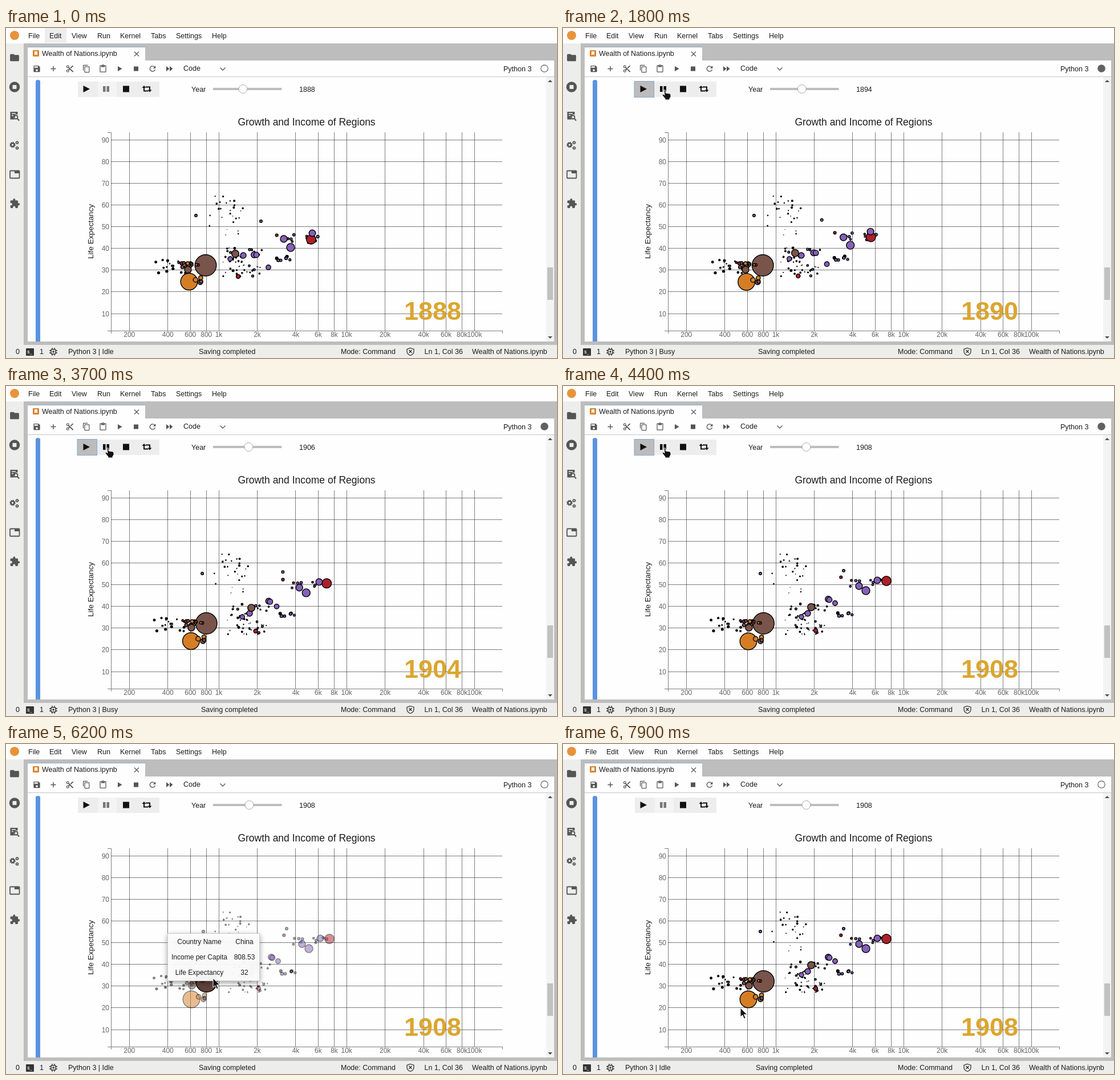
An HTML page for the animation above (8000 ms loop, 966 by 579 pixels).

```html
<!DOCTYPE html>
<html lang="en">
<head>
<meta charset="utf-8">
<title>Notebook bubble chart</title>
<style>
  html, body { margin: 0; width: 100%; height: 100%; overflow: hidden; background: #bdbdbd; }
  svg { display: block; width: 966px; height: 579px; font: 12.5px "Liberation Sans", Arial, sans-serif; }
  text { fill: #1c1c1c; white-space: pre; }
  .axis { font-size: 12px; fill: #666; }
  .mid { text-anchor: middle; }
  .end { text-anchor: end; }
</style>
</head>
<body>
<svg id="stage" viewBox="0 0 966 579" xmlns="http://www.w3.org/2000/svg"></svg>
<script>
const stage = document.getElementById('stage');

const set = (node, attrs) => { for (const key in attrs) node.setAttribute(key, attrs[key]); };
const show = (node, on) => node.setAttribute('visibility', on ? 'visible' : 'hidden');
function add(tag, attrs = {}, parent = stage) {
  const node = document.createElementNS('http://www.w3.org/2000/svg', tag);
  set(node, attrs);
  return parent.appendChild(node);
}
const rect = (x, y, width, height, fill, more, parent) =>
  add('rect', { x, y, width, height, fill, ...more }, parent);
const circle = (cx, cy, r, more, parent) => add('circle', { cx, cy, r, ...more }, parent);
const path = (d, more, parent) => add('path', { d, ...more }, parent);
const stroke = (d, color = '#555', width = 1.5) =>
  path(d, { fill: 'none', stroke: color, 'stroke-width': width });
function text(x, y, content, more, parent) {
  const node = add('text', { x, y, ...more }, parent);
  node.textContent = content;
  return node;
}
// 24-unit icon centred on (x, y)
const icon = (x, y, size, d) =>
  path(d, { fill: '#555', transform: `translate(${x - size / 2} ${y - size / 2}) scale(${size / 24})` });

// ---------- window chrome ----------
rect(0, 0, 966, 27, '#fefefe');
const editHover = rect(68, 0, 38, 26, '#ededed');
circle(15, 13, 8, { fill: '#e8933a' });
[['File', 39], ['Edit', 76], ['View', 115], ['Run', 160], ['Kernel', 200], ['Tabs', 254],
 ['Settings', 298], ['Help', 361]].forEach(([label, x]) => text(x, 17.5, label));
rect(0, 27, 31, 529, '#ededec');
rect(38, 33, 206, 25, '#fefefe');
rect(38, 33, 206, 1, '#8fb0c4');
rect(38, 57, 923, 28, '#fefefe');
rect(38, 86, 923, 464, '#fefefe');

rect(47, 39, 11, 11, '#d9822b', { rx: 1 });
path('M50 41h5v7l-2.5-2-2.5 2z', { fill: '#fff' });
text(63, 48.5, 'Wealth of Nations.ipynb');
stroke('M225 41.5l8 8m0-8l-8 8', '#555', 1.2);

// ---------- sidebar ----------
icon(15, 52, 19, 'M10 4H4c-1.1 0-2 .9-2 2v12c0 1.1.9 2 2 2h16c1.1 0 2-.9 2-2V8c0-1.1-.9-2-2-2h-8z');
circle(15, 103.5, 9.3, { fill: '#555' });
rect(11.5, 100, 7, 7, '#ededec', { rx: 1 });
path('M7.500 147h13v5a5 5 0 0 0-5 8.500h-8z', { fill: '#555' });
stroke('M10 150h7M10 153.500h3', '#ededec', 1.3);
circle(17.5, 156.5, 3, { fill: 'none', stroke: '#555', 'stroke-width': 1.8 });
stroke('M20 159l3 3.5', '#555', 2);
function gear(x, y, r) {
  circle(x, y, r, { fill: 'none', stroke: '#555', 'stroke-width': r * .9 });
  circle(x, y, r * 1.5, { fill: 'none', stroke: '#555', 'stroke-width': r * .5,
    'stroke-dasharray': r * 1.5 * Math.PI / 8 });
}
gear(11.5, 205, 3);
gear(19.5, 201, 1.8);
gear(19.5, 210.5, 1.8);
rect(7, 250.5, 16.5, 13, 'none', { rx: 1, stroke: '#555', 'stroke-width': 1.8 });
rect(15, 250, 8, 5, '#555');
icon(15.5, 308, 19, 'M20.5 11H19V7c0-1.1-.9-2-2-2h-4V3.5a2.500 2.500 0 0 0-5 0V5H4c-1.1 0-2 .9-2 2v3.8h1.5a2.700 2.700 0 0 1 0 5.400H2V20c0 1.1.9 2 2 2h3.8v-1.500a2.700 2.700 0 0 1 5.400 0V22H17c1.1 0 2-.9 2-2v-4h1.5a2.500 2.500 0 0 0 0-5z');

// ---------- toolbar ----------
icon(54, 71.5, 15, 'M17 3H5a2 2 0 0 0-2 2v14c0 1.1.9 2 2 2h14c1.1 0 2-.9 2-2V7zM12 19a3 3 0 1 1 0-6 3 3 0 0 1 0 6zM15 9H5V5h10z');
stroke('M78.500 71.5h9m-4.500-4.500v9', '#555', 1.4);
icon(112, 71.5, 15, 'M9.6 7.6A4 4 0 1 0 7.6 9.6L10 12l-2.4 2.4A4 4 0 1 0 9.6 16.4L12 14l7 7h3v-1zM6 8a2 2 0 1 1 0-4 2 2 0 0 1 0 4zM6 20a2 2 0 1 1 0-4 2 2 0 0 1 0 4zM19 3l-6 6 2 2 7-7V3z');
icon(141, 71.5, 14.5, 'M16 1H4a2 2 0 0 0-2 2v14h2V3h12zM19 5H8a2 2 0 0 0-2 2v14c0 1.1.9 2 2 2h11c1.1 0 2-.9 2-2V7a2 2 0 0 0-2-2zm0 16H8V7h11z');
icon(170, 71.5, 15, 'M19 2h-4.200a3 3 0 0 0-5.600 0H5a2 2 0 0 0-2 2v16c0 1.1.9 2 2 2h14c1.1 0 2-.9 2-2V4a2 2 0 0 0-2-2zM12 2a1 1 0 1 1 0 2 1 1 0 0 1 0-2zM19 20H5V4h2v3h10V4h2z');
path('M196 67l7.5 4.5-7.5 4.5z', { fill: '#555' });
rect(224, 67.5, 8, 8, '#555');
icon(257, 71.5, 16, 'M17.65 6.35A8 8 0 1 0 19.73 14h-2.08A6 6 0 1 1 16.22 7.78L13 11h7V4z');
path('M281 67l5.5 4.5-5.5 4.5zm6 0l5.5 4.5-5.5 4.5z', { fill: '#555' });
text(311, 75, 'Code');
stroke('M375.5 69.5l4.5 4.5 4.5-4.5', '#555', 1.3);
text(872, 75.5, 'Python 3');
const kernelLight = circle(944, 71, 6.2, { stroke: '#616161', 'stroke-width': 1.2 });

// ---------- output area ----------
rect(38, 85, 923, 1, '#c4c4c4');
path('M52 550V94q0-3 4-3t4 3V550z', { fill: '#5b93e0' });
rect(947, 86, 14, 464, '#f3f3f3');
rect(949, 420, 10, 57, '#c1c1c1');
path('M950 95l4-4 4 4zM950 541l4 4 4-4z', { fill: '#505050' });

rect(126, 94, 143, 27, '#ededed');
const playPressed = rect(125, 93.5, 34.5, 28, '#bcbcbc', { stroke: '#86a9cf' });
const pauseOff = rect(161, 94, 33, 27, '#f4f4f4');
path('M135.5 101l11.5 6-11.5 6z', { fill: '#111' });
const pauseIcon = path('M170 102h4.5v10h-4.5zm6.5 0h4.5v10h-4.5z');
rect(205, 101.5, 11, 11, '#111');
stroke('M242 104v6.5h7.5M252 109.5v-6h-7', '#111', 2);
path('M238.5 105l3.5-4 3.5 4zM248.5 108.5h7l-3.5 4z', { fill: '#111' });

text(325, 111.5, 'Year');
rect(363, 105, 120.5, 4, '#bdbdbd');
const knob = circle(415.5, 107, 7.5, { fill: '#fff', stroke: '#a8a8a8' });
const yearText = text(514, 111.5, '');

// ---------- chart ----------
const xOf = income => 373 + 224.2 * Math.log10(income / 1000);
const yOf = age => 539.1 - 3.81 * age;
const grid = { fill: 'none', stroke: '#000', 'stroke-opacity': .5, 'shape-rendering': 'crispEdges' };

text(527, 171, 'Growth and Income of Regions', { class: 'mid', 'font-size': 17.5 });
for (let age = 10; age <= 90; age += 10) {
  const y = Math.floor(yOf(age));
  path(`M184 ${y + .5}H870`, grid);
  text(181, y + 4.5, age, { class: 'axis end' });
}
for (let decade = 100; decade <= 1e5; decade *= 10)
  for (const factor of [1, 2, 4, 6, 8]) {
    const income = decade * factor;
    if (income < 200 || income > 1e5) continue;
    const x = xOf(income);
    path(`M${Math.floor(x) + .5} 183V531`, grid);
    text(x, 542, income < 1000 ? income : income / 1000 + 'k', { class: 'axis mid' });
  }
path('M178 183.5H184.5V536M178 531.5H870.5V536', grid);
text(0, 0, 'Life Expectancy', { class: 'mid', 'font-size': 13.6, transform: 'translate(153 357) rotate(-90)' });
text(527, 559, 'Income per Capita', { class: 'mid', 'font-size': 13.6 });
const bigYear = text(748, 511.5, '', { class: 'mid', 'font-size': 45, 'font-weight': 'bold', style: 'fill:#dba62f' });

// ---------- bubbles ----------
const brown = '#79544b', orange = '#d57d25', purple = '#8660bb', red = '#ae1f2a', blue = '#5879ba', ink = '#151515';
const bubbles = [];
const field = add('g', { stroke: '#000' });

function bubble(fill, r, x, y, dx, dy = 0) {
  const node = circle(x, y, r, { fill, 'stroke-width': Math.min(1.4, r) }, field);
  bubbles.push({ node, x, y, dx, dy });
}

let seed = 11;
const random = () => (seed = seed * 16807 % 2147483647) / 2147483647;
const between = (low, high) => low + (high - low) * random();
// Scatter bubbles inside a box; all of them drift alike, give or take
function swarm(count, palette, [rMin, rMax], [left, right], [top, bottom], dx, dy = 0) {
  for (let i = 0; i < count; i++)
    bubble(palette[i % palette.length], between(rMin, rMax), between(left, right), between(top, bottom),
      dx * between(.8, 1.2), dy * between(.6, 1.4));
}

bubble(brown, 18.8, 350, 416.5, 1.5);
bubble(orange, 14.8, 321, 445, 4, 3);
swarm(18, [ink, blue, ink], [.9, 2], [262, 318], [406, 430], -3);
swarm(14, [brown, orange, red, brown], [1.800, 3.2], [302, 344], [411, 424], 8);
swarm(4, [orange, brown], [3, 4.5], [328, 346], [438, 452], 6, 2);
swarm(40, [ink], [.5, 1.4], [380, 446], [385, 436], 11);
swarm(14, [purple, blue, ink], [1.2, 2.2], [384, 450], [385, 436], 14, -3);
swarm(12, [ink], [.6, 1.4], [366, 404], [293, 325], 12);
swarm(14, [ink], [.4, 1.2], [346, 420], [316, 366], 11);
swarm(7, [purple, blue, ink], [1.8, 2.600], [468, 498], [398, 412], 8, -4);
swarm(11, [blue, purple, red], [1.6, 2.400], [472, 550], [361, 378], 14, -26);

[[brown, 6, 319, 424, 7, 0], [purple, 4, 393, 405, 25, 0], [red, 3.5, 407, 436, 36, -7],
 [blue, 2.3, 333, 329, 13, 0], [blue, 2.3, 447, 339, 45, -15],
 [red, 8.3, 535, 371, 32, -29], [purple, 5.8, 537, 360, 14, -19], [purple, 7, 499, 385, 32, -26],
 [purple, 6, 487, 370, 32, -19], [purple, 5, 416, 399, 13, 0], [brown, 6.3, 402, 396, 33, -8],
 [purple, 5.3, 435, 398, 30, -24], [purple, 4.700, 439, 398, 28, -23], [purple, 4.2, 460, 420, 17, -39]]
  .forEach(args => bubble(...args));

// ---------- status bar ----------
rect(38, 550, 923, 6, '#bdbdbd');
rect(0, 556, 966, 23, '#ededec');
text(17, 572, '0');
rect(35, 562, 14, 13, '#333', { rx: 1 });
text(37, 571, '$_', { 'font-size': 8, style: 'fill:#fff' });
text(59, 572, '1');
rect(79, 564, 8, 8, 'none', { stroke: '#333', 'stroke-width': 1.5, rx: 1 });
rect(81.5, 566.5, 3, 3, '#333');
stroke('M81 564v-3m4 3v-3M81 575v-3m4 3v-3M79 566h-3m3 4h-3M90 566h-3m3 4h-3', '#333', 1.3);
const kernelText = text(109, 572, '');
const savedText = text(338, 572, 'Saving completed');
text(587, 572, 'Mode: Command');
stroke('M709 561.5l6 2v4q0 5-6 7q-6-2-6-7v-4zM706.5 565l5 5m0-5l-5 5', '#333', 1.3);
text(733.5, 572, 'Ln 1, Col 36');
text(817, 572, 'Wealth of Nations.ipynb');

// ---------- tooltip and pointer ----------
const tooltip = add('g', { style: 'filter:drop-shadow(0 3px 5px rgba(0,0,0,.4))' });
rect(283.5, 332.5, 161, 83, '#fff', { 'fill-opacity': .94, stroke: '#ccc' }, tooltip);
[['Country Name', 'China'], ['Income per Capita', '808.53'], ['Life Expectancy', '32']].forEach((row, i) =>
  row.forEach((cell, j) => text(j ? 418 : 339, 351 + 27 * i, cell, { class: 'mid', 'font-size': 12 }, tooltip)));

const outline = { fill: '#111', stroke: '#fff' };
const arrow = path('M0 0V16l3.7-3.3 2.8 6.3 2.7-1.2-2.8-6H12z', outline);
const hand = path('M-3-1q2-1 3 1v4l7 1q2 .5 2 3v3l-2 2.500v2.500H-1v-2l-5-6q0-2 2-2l2 2z', outline);

// ---------- timeline ----------
const clamp = v => Math.min(1, Math.max(0, v));
const playStart = 1200, playEnd = 4600;
const idleMoments = [2000, 2500, 2700, 3100, 3300, 3400, 4000, 4300];
// time, x, y: enter, play button, pause button, chart, big bubble, below it
const pointerStops = [[200, 88, 0], [400, 108, 178], [1100, 141, 105], [1300, 143, 106], [1600, 180, 110],
  [4600, 180, 110], [5000, 288, 273], [5200, 300, 250], [5700, 355, 403], [6200, 363, 411],
  [7300, 363, 411], [7600, 311, 463]];

function pointerAt(t) {
  const next = pointerStops.findIndex(stop => stop[0] > t);
  if (next < 1) return pointerStops.at(next).slice(1);
  const [t0, x0, y0] = pointerStops[next - 1], [t1, x1, y1] = pointerStops[next];
  const k = (t - t0) / (t1 - t0);
  return [x0 + (x1 - x0) * k, y0 + (y1 - y0) * k];
}
const yearAt = progress => 1888 + 2 * Math.floor(10 * progress);

function draw(now) {
  const t = Math.floor(now % 8000 / 100) * 100;
  const playing = t >= playStart && t < playEnd;
  const hovering = t >= 5500 && t < 7500;
  const busy = playing ? !idleMoments.includes(t) : [6000, 6100, 6400, 6500].includes(t);
  // The slider runs ahead, the chart follows at an even pace
  const ahead = 1 - (1 - clamp((t - 1000) / 3100)) ** 1.4;
  const progress = clamp((t - 1400) / 2700);
  const year = yearAt(ahead);

  show(editHover, t < 200);
  show(playPressed, playing);
  show(pauseOff, !playing);
  set(pauseIcon, { fill: playing ? '#111' : '#777' });
  set(knob, { cx: 415.5 + (year - 1888) * .55 });
  yearText.textContent = year;
  bigYear.textContent = yearAt(progress);
  set(kernelLight, { fill: busy ? '#616161' : '#fff' });
  kernelText.textContent = 'Python 3 | ' + (busy ? 'Busy' : 'Idle');
  set(savedText, { x: busy ? 342 : 338 });

  bubbles.forEach(({ node, x, y, dx, dy }, i) => set(node, {
    cx: x + dx * progress, cy: y + dy * progress, opacity: hovering && i ? .5 : 1,
  }));
  set(bubbles[0].node, { fill: hovering ? '#60423a' : brown });
  show(tooltip, hovering);

  const [x, y] = pointerAt(t);
  const onButton = x > 126 && x < 195 && y > 94 && y < 122;
  show(arrow, t >= 200 && !onButton);
  show(hand, onButton);
  set(onButton ? hand : arrow, { transform: `translate(${x} ${y})` });
  requestAnimationFrame(draw);
}
draw(performance.now());
</script>
</body>
</html>
```
